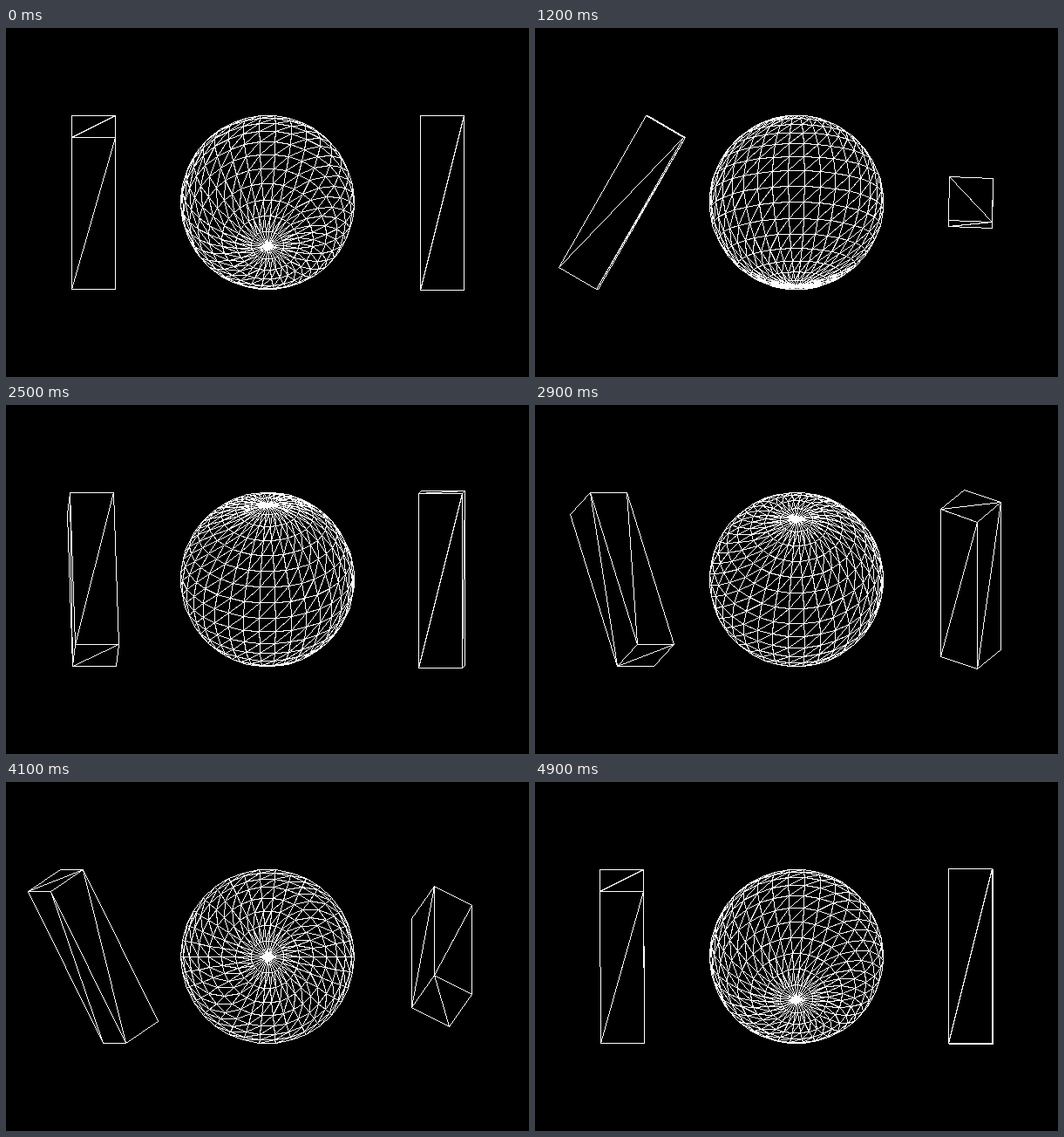
Write an HTML page with a canvas that moves like this. It is 600 px wide and 400 px high and loops after 5000 ms.

```html
<!DOCTYPE html>
<html lang="en">
<head>
<meta charset="utf-8">
<title>Rotating wireframes</title>
<style>
html, body { margin: 0; width: 100%; height: 100%; overflow: hidden; background: #000; }
canvas { display: block; }
</style>
</head>
<body>
<canvas id="stage" width="600" height="400"></canvas>
<script>
const W = 600, H = 400;
const STEP_MS = 100, STEPS = 50, TURN = 0.064;
const ctx = document.getElementById('stage').getContext('2d');
const image = ctx.createImageData(W, H);
const pixels = new Uint32Array(image.data.buffer);
const BLACK = 0xff000000, WHITE = 0xffffffff;

// x points right, y down, z towards the viewer
function rotX([x, y, z], a) {
  const c = Math.cos(a), s = Math.sin(a);
  return [x, y * c + z * s, z * c - y * s];
}

function rotY([x, y, z], a) {
  const c = Math.cos(a), s = Math.sin(a);
  return [x * c + z * s, y, z * c - x * s];
}

// Quads run counterclockwise seen from outside, starting at the lower left
function makeBox(w, h, d) {
  const v = (x, y, z) => [x * w / 2, y * h / 2, z * d / 2];
  const ftl = v(-1, -1, 1), ftr = v(1, -1, 1), fbl = v(-1, 1, 1), fbr = v(1, 1, 1);
  const btl = v(-1, -1, -1), btr = v(1, -1, -1), bbl = v(-1, 1, -1), bbr = v(1, 1, -1);
  return [
    [fbl, fbr, ftr, ftl],
    [fbr, bbr, btr, ftr],
    [bbr, bbl, btl, btr],
    [bbl, fbl, ftl, btl],
    [ftl, ftr, btr, btl],
    [bbl, bbr, fbr, fbl]
  ];
}

function makeSphere(radius, rings, sectors) {
  const v = (k, j) => {
    const lat = k * Math.PI / rings, lon = j * 2 * Math.PI / sectors;
    const r = radius * Math.sin(lat);
    return [r * Math.cos(lon), r * Math.sin(lon), radius * Math.cos(lat)];
  };
  const quads = [];
  for (let k = 0; k < rings; k++) {
    for (let j = 0; j < sectors; j++) {
      quads.push([v(k, j), v(k, j + 1), v(k + 1, j + 1), v(k + 1, j)]);
    }
  }
  return quads;
}

function line(p, q) {
  let [x, y] = p.map(n => Math.floor(n + 1e-6));
  const [x1, y1] = q.map(n => Math.floor(n + 1e-6));
  const dx = Math.abs(x1 - x), dy = -Math.abs(y1 - y);
  const sx = x < x1 ? 1 : -1, sy = y < y1 ? 1 : -1;
  let err = dx + dy;
  for (;;) {
    pixels[y * W + x] = WHITE;
    if (x === x1 && y === y1) return;
    const e = 2 * err;
    if (e >= dy) { err += dy; x += sx; }
    if (e <= dx) { err += dx; y += sy; }
  }
}

function triangle(a, b, c) {
  const cross = (b[0] - a[0]) * (c[1] - a[1]) - (b[1] - a[1]) * (c[0] - a[0]);
  if (cross > -1e-9) return;
  line(a, b);
  line(b, c);
  line(c, a);
}

function drawMesh(quads, cx, cy, turn) {
  for (const quad of quads) {
    const [a, b, c, d] = quad.map(p => {
      const [x, y] = turn(p);
      return [cx + x, cy + y];
    });
    triangle(a, b, c);
    triangle(a, c, d);
  }
}

const box = makeBox(50, 200, 50);
const sphere = makeSphere(100, 17, 34);
const TILT = Math.PI / 6;
let shown = -1;

function draw(step) {
  const a = step * TURN;
  pixels.fill(BLACK);
  drawMesh(box, 100, 200, p => rotY(rotX(p, TILT), 2 * a));
  drawMesh(sphere, 300, 200, p => rotX(p, TILT + a));
  drawMesh(box, 500, 200, p => rotX(rotY(p, 2 * a), 2 * a));
  ctx.putImageData(image, 0, 0);
}

function tick() {
  const step = Math.floor(performance.now() / STEP_MS) % STEPS;
  if (step !== shown) draw(shown = step);
  requestAnimationFrame(tick);
}

tick();
</script>
</body>
</html>
```
